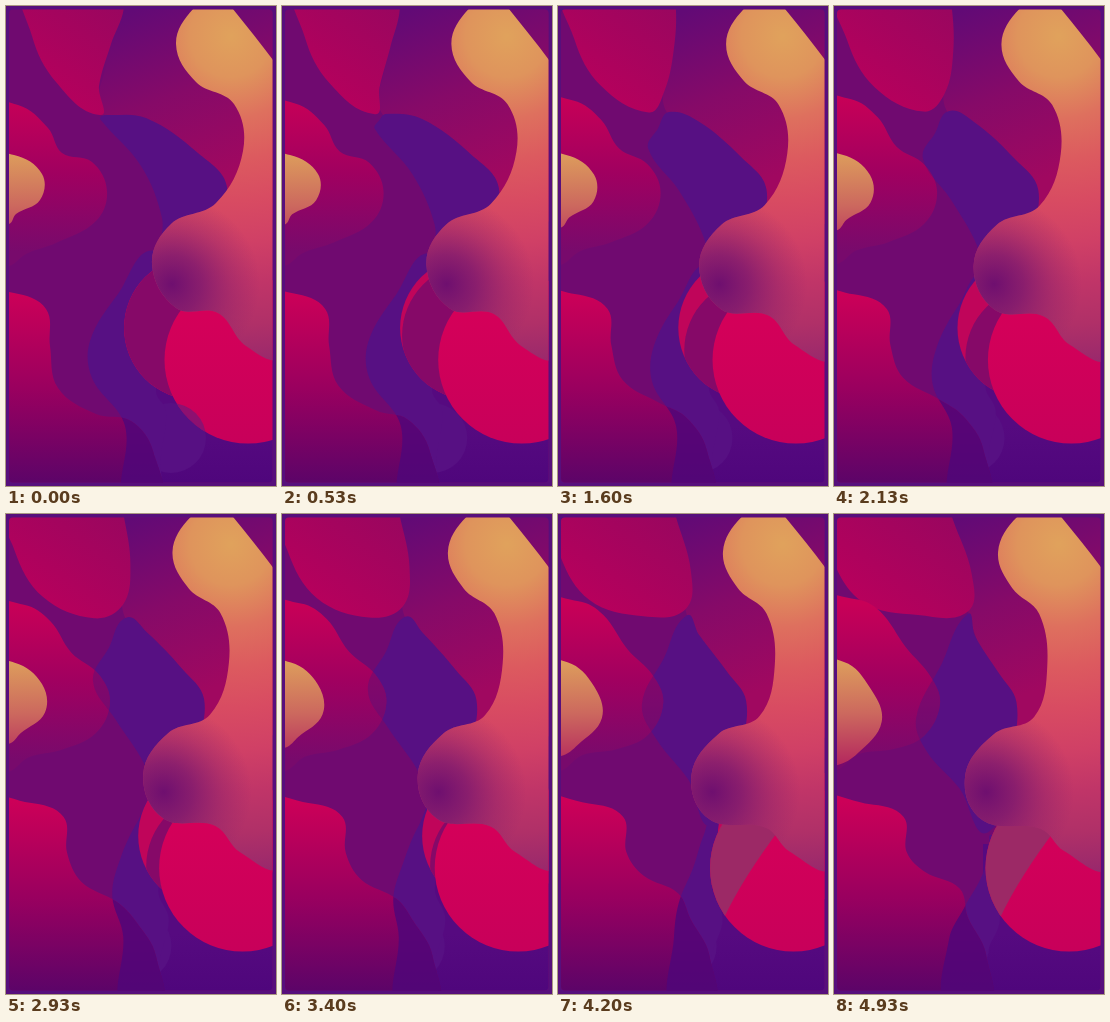
Recreate the animation shown at these times as an HTML page with a canvas. Size 270 by 480 pixels, loop 4990 ms.

```html
<!DOCTYPE html>
<html lang="en">
<head>
<meta charset="utf-8">
<title>Flowing blobs</title>
<style>
  html, body { margin: 0; width: 100%; height: 100%; overflow: hidden; background: #570f7c; }
  canvas { display: block; width: 100vw; height: 100vh; }
</style>
</head>
<body>
<canvas id="stage"></canvas>
<script>
const W = 270, H = 480, LOOP = 4990, FPS = 15;
const canvas = document.getElementById('stage');
const ctx = canvas.getContext('2d');

// A blob drifts from one ring of x,y key points to another; power bends its timing.
const blobs = {
  gold: {
    power: 1,
    from: [215,-12, 188,2, 170,38, 190,76, 228,98, 237,145, 210,197, 165,218, 146,258, 170,302, 212,307, 240,340, 275,350, 320,170],
    to: [215,-12, 184,2, 164,38, 178,74, 205,100, 213,152, 200,203, 160,220, 131,262, 148,306, 207,315, 230,337, 275,353, 320,170]
  },
  plum: {
    power: 1,
    from: [115,-20, 100,60, 95,107, 150,135, 200,188, 300,200, 300,-20],
    to: [115,-20, 130,60, 135,99, 150,145, 176,215, 300,200, 300,-20]
  },
  blueTop: {
    power: 1,
    from: [100,109, 140,112, 192,147, 221,181, 205,230, 160,270, 156,212, 135,160, 94,113, 96,110],
    to: [134,100, 141,122, 165,160, 182,188, 178,235, 155,318, 125,275, 92,238, 82,205, 108,150]
  },
  blueLow: {
    power: 1.5,
    from: [150,245, 165,300, 150,385, 160,405, 155,450, 150,500, 118,500, 119,420, 86,372, 84,335, 112,288],
    to: [157,322, 165,330, 155,367, 166,405, 153,440, 151,500, 112,500, 115,425, 131,394, 150,360, 156,330]
  },
  topRed: {
    power: 1,
    from: [20,-30, 26,30, 50,76, 94,109, 93,80, 105,38, 118,0, 110,-30],
    to: [-20,-30, -4,40, 28,88, 84,101, 134,98, 138,60, 117,0, 110,-30]
  },
  leftRed: {
    power: 1,
    from: [-40,99, 12,99, 42,122, 56,147, 86,156, 101,185, 90,215, 50,237, 20,248, 3,260, -40,262],
    to: [-40,87, 22,85, 46,97, 72,133, 97,163, 106,190, 90,222, 60,235, 25,240, 3,256, -40,262]
  },
  leftGold: {
    power: 2,
    from: [-40,150, 8,149, 36,168, 34,194, 10,208, 3,218, -40,222],
    to: [-40,148, 10,148, 36,174, 48,208, 24,240, 3,252, -40,256]
  },
  lowRed: {
    power: 1,
    from: [-40,288, 8,287, 40,303, 44,340, 52,382, 90,408, 125,415, 147,445, 149,500, -40,500],
    to: [-40,288, 35,290, 70,303, 73,338, 92,358, 126,374, 134,403, 152,440, 150,500, -40,500]
  }
};

// Closed smooth curve: handles follow the neighbours, with length set by the segment.
function blob({ from, to, power }, s) {
  const k = s ** power, n = from.length / 2, path = new Path2D();
  const mix = j => from[j] + (to[j] - from[j]) * k;
  const at = i => { const j = (i + n) % n * 2; return [mix(j), mix(j + 1)]; };
  const handle = (i, length) => {
    const [a, b] = [at(i - 1), at(i + 1)];
    const f = length / (Math.hypot(b[0] - a[0], b[1] - a[1]) || 1);
    return [(b[0] - a[0]) * f, (b[1] - a[1]) * f];
  };
  path.moveTo(...at(0));
  for (let i = 0; i < n; i++) {
    const a = at(i), b = at(i + 1);
    const length = .36 * Math.hypot(b[0] - a[0], b[1] - a[1]);
    const h = handle(i, length), g = handle(i + 1, length);
    path.bezierCurveTo(a[0] + h[0], a[1] + h[1], b[0] - g[0], b[1] - g[1], ...b);
  }
  path.closePath();
  return path;
}

function circle(x, y, r) {
  const path = new Path2D();
  path.arc(x, y, r, 0, Math.PI * 2);
  return path;
}

function fade(gradient, colors) {
  colors.forEach((c, i) => gradient.addColorStop(i / (colors.length - 1), c));
  return gradient;
}
const shade = (x0, y0, x1, y1, ...colors) => fade(ctx.createLinearGradient(x0, y0, x1, y1), colors);
const glow = (x, y, r, ...colors) => fade(ctx.createRadialGradient(x, y, 0, x, y, r), colors);

function paint(path, fill) {
  ctx.fillStyle = fill;
  ctx.fill(path);
}

function overlap(a, b, fill) {
  ctx.save();
  ctx.clip(a);
  paint(b, fill);
  ctx.restore();
}

// Curved edge that sweeps in over the big disc late in the loop.
function sweep(t) {
  const u = Math.min(1, Math.max(0, (t - 3300) / 900));
  const dx = -80 * (1 - u * u * (3 - 2 * u));
  const path = new Path2D();
  path.moveTo(224 + dx, 312);
  path.quadraticCurveTo(184 + dx, 365, 166 + dx, 404);
  path.lineTo(60, 404);
  path.lineTo(60, 250);
  path.lineTo(224 + dx, 250);
  return path;
}

function draw(t) {
  const s = t / LOOP;
  const shape = {};
  for (const name in blobs) shape[name] = blob(blobs[name], s);

  const corner = new Path2D();
  corner.rect(149, 330, 130, 160);
  const blue = new Path2D();
  blue.addPath(shape.blueTop);
  blue.addPath(shape.blueLow);
  const tail = circle(165 - 45 * Math.sqrt(s), 432, 35);
  const disc = circle(242 - 7 * Math.sqrt(s), 354, 83.5);
  const ballX = 190 + 70 * s ** 3, slip = Math.min(1, s / .43);
  const ball = circle(ballX, 322, 72);

  ctx.setTransform(canvas.width / W, 0, 0, canvas.height / H, 0, 0);
  ctx.fillStyle = '#570f7c';
  ctx.fillRect(0, 0, W, H);
  ctx.save();
  ctx.beginPath();
  ctx.roundRect(3, 3.5, 263.5, 473, 4);
  ctx.clip();

  ctx.fillStyle = '#700a70';
  ctx.fillRect(0, 0, W, H);
  paint(corner, shade(0, 420, 0, 477, '#560a80', '#4f067c'));

  paint(shape.plum, shade(140, 0, 205, 175, '#620a76', '#860a68', '#a00860'));
  overlap(corner, tail, '#571083');
  paint(blue, '#571083');
  paint(shape.topRed, shade(110, 0, 40, 100, '#9a065f', '#b8005c'));

  paint(shape.leftRed, shade(0, 90, 0, 245, '#c80057', '#a00060', '#780a6c'));
  overlap(shape.leftRed, blue, 'rgba(90,16,120,.45)');
  paint(shape.leftGold, shade(12, 150, 15, 250, '#dc9a5c', '#cc685e', '#b4285e'));

  paint(shape.lowRed, shade(0, 287, 0, 477, '#cc0058', '#9a005f', '#5c0468'));
  const dark = new Path2D(blue);
  dark.addPath(corner);
  overlap(shape.lowRed, dark, 'rgba(80,6,122,.85)');

  paint(ball, '#c0055a');
  overlap(ball, circle(ballX + 8 * slip, 322 + 30 * slip, 72), '#860968');
  paint(disc, shade(0, 310, 0, 438, '#d40059', '#c8005a'));
  overlap(disc, tail, `rgba(110,25,125,${.65 * (1 - slip)})`);
  overlap(disc, sweep(t), '#9c2966');

  paint(shape.gold, glow(225, 30, 330,
    '#e0a25c', '#df945c', '#de705e', '#dc5a5f', '#d84b62', '#d04066', '#c03568', '#b03068', '#98286c'));
  paint(shape.gold, glow(166 - 14 * s, 278, 88,
    'rgba(104,12,112,.92)', 'rgba(110,18,112,.66)', 'rgba(120,24,110,.3)', 'rgba(130,30,108,0)'));
  ctx.restore();
}

function resize() {
  const dpr = window.devicePixelRatio || 1;
  canvas.width = Math.round(innerWidth * dpr);
  canvas.height = Math.round(innerHeight * dpr);
}

const start = performance.now();
function tick() {
  const t = (performance.now() - start) % LOOP;
  const index = Math.floor((t + 3.4) * FPS / 1000);
  draw(Math.min(index, 74) * 1000 / FPS);
  requestAnimationFrame(tick);
}

addEventListener('resize', resize);
resize();
tick();
</script>
</body>
</html>
```
